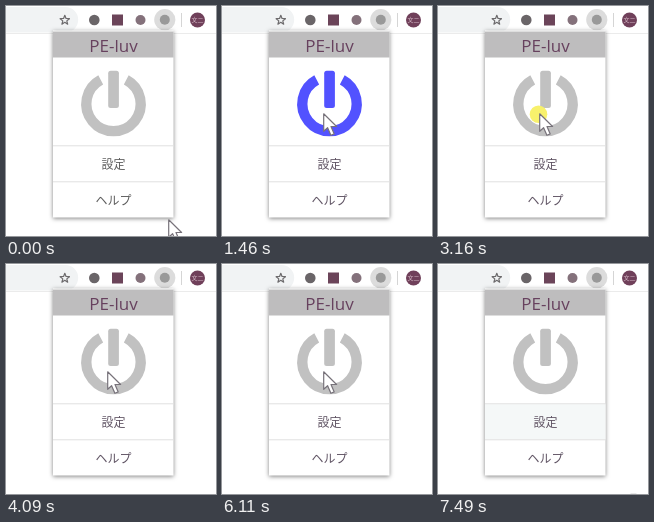
An HTML page for the animation above (7.65 s loop, 210 by 230 pixels).

```html
<!DOCTYPE html>
<html lang="ja">
<head>
<meta charset="utf-8">
<title>Popup toggle</title>
<style>
  html, body { margin: 0; width: 100%; height: 100%; overflow: hidden; background: #fff; }
  svg { display: block; width: 210px; height: 230px; overflow: visible; filter: blur(.35px); }
  text { text-anchor: middle; }
  .title { font: 500 17px "Open Sans", "Noto Sans", sans-serif; fill: #67415e; }
  .row { font: 300 12px "Noto Sans CJK JP", "Noto Sans CJK", sans-serif; }
  .badge { font: 6px "Noto Sans CJK JP", "Noto Sans CJK", sans-serif; fill: #d3b6c4; }
  #popup { filter: drop-shadow(0 1px 2px rgba(0, 0, 0, .5)); }
</style>
</head>
<body>
<svg viewBox="0 0 210 230">
  <rect x="-5" y="-5" width="220" height="240" fill="#fff"/>
  <!-- toolbar -->
  <path d="M-5 1H59.500A12.700 12.700 0 0 1 59.500 26.400H-5Z" fill="#f1f3f4"/>
  <path id="star" fill="none" stroke="#6c6a6c" stroke-width="1.200" stroke-linejoin="round"/>
  <circle cx="88.300" cy="14" r="5.300" fill="#6a6568"/>
  <rect x="106" y="8.500" width="11" height="11" fill="#6b4459"/>
  <circle cx="134.500" cy="14" r="5" fill="#84717b"/>
  <circle cx="158.800" cy="13.700" r="10.600" fill="#dcdcdc"/>
  <circle cx="158.800" cy="13.700" r="5" fill="#999"/>
  <path d="M175.500 7V21" stroke="#d5d5d5"/>
  <circle cx="191.500" cy="14" r="7.500" fill="#70405a"/>
  <text class="badge" x="191.500" y="16.300">文二</text>
  <path d="M-5 27.500H215" stroke="#ebebeb"/>
  <!-- popup -->
  <rect id="popup" x="47" y="24.500" width="120.500" height="187" fill="#fff"/>
  <rect x="47" y="25.500" width="120.500" height="26" fill="#bebdbe"/>
  <text class="title" x="107.500" y="45.500">PE-luv</text>
  <rect id="hover" x="47" width="120.500" height="35" fill="#f5f8f8"/>
  <path d="M47 139.800H167.500M47 175.800H167.500" stroke="#e0e0e0"/>
  <g id="rows" class="row">
    <text x="107.500" y="162.800">設定</text>
    <text x="107.500" y="198.500">ヘルプ</text>
  </g>
  <g id="power">
    <path id="ring" fill="none" stroke="currentColor" stroke-width="10.300"/>
    <rect x="102.200" y="64.700" width="10.700" height="37.300" rx="2.500" fill="currentColor"/>
  </g>
  <circle id="click" cx="100.500" cy="108.300" r="8.800" fill="#f8f16c"/>
  <path id="cursor" d="M.7.800V18.300L4.600 14.700 7.900 22.300 11.200 20.900 8 13.500H13.600Z"
    fill="#fff" stroke="#77727a" stroke-width="1.200" stroke-linejoin="round"/>
  <path id="edge" d="M192.500 229.500H198.500" stroke="#e6e6e6"/>
</svg>
<script>
const LOOP = 7650;
const $ = id => document.getElementById(id);
const GRAY = [193, 193, 193], BLUE = [82, 82, 255];
const START = [162, 213], PAUSE = [131, 134], BUTTON = [101, 107], EXIT = [185, 227], BEND = [192, 180];

const mix = (a, b, p) => a.map((v, i) => v + (b[i] - v) * p);
const ease = p => p * p * (3 - 2 * p);
const within = (t, a, b) => t >= a && t < b;

// Progress in n equal jumps, the first at a and the last at b.
function steps(t, a, b, n) {
  if (t < a) return 0;
  return Math.min(1, (Math.floor((t - a) / (b - a) * (n - 1) + .02) + 1) / n);
}

function cursorAt(t) {
  if (t < 680) return mix(START, PAUSE, ease(steps(t, 70, 370, 5)));
  if (t < 6260) return mix(PAUSE, BUTTON, ease(steps(t, 680, 990, 5)));
  const p = steps(t, 6260, 6720, 7);
  return mix(mix(BUTTON, BEND, p), mix(BEND, EXIT, p), p);
}

// How far the button is switched on, with a half step in each fade.
function powerAt(t) {
  if (within(t, 1460, 2070) || within(t, 3310, 4090) || within(t, 5250, 6040)) return 1;
  if (within(t, 2070, 2150) || within(t, 5170, 5250) || within(t, 6040, 6110)) return .5;
  return 0;
}

function hoverRow(t, [x, y]) {
  if (t >= 6337) return 0;
  if (t < 70 || x > 167 || y < 141 || y > 212) return -1;
  return y < 177 ? 0 : 1;
}

function draw(t) {
  const pos = cursorAt(t), row = hoverRow(t, pos);
  $('cursor').setAttribute('transform', `translate(${pos.map(Math.round)})`);
  $('cursor').setAttribute('opacity', t < 6950 ? 1 : t < 7030 ? .4 : 0);
  $('hover').setAttribute('opacity', row < 0 ? 0 : 1);
  $('hover').setAttribute('y', row === 1 ? 176.3 : 140.3);
  $('rows').setAttribute('fill', t < 220 ? '#5c5c5c' : '#5f5363');
  $('power').setAttribute('color', `rgb(${mix(GRAY, BLUE, powerAt(t)).map(Math.round)})`);
  const clicked = within(t, 1300, 1460) || within(t, 3160, 3310) || within(t, 3920, 4090);
  $('click').setAttribute('opacity', clicked ? 1 : 0);
  $('edge').setAttribute('opacity', t >= 7490 ? 1 : 0);
}

function buildShapes() {
  const star = Array.from({ length: 10 }, (_, i) => {
    const r = i % 2 ? 2.1 : 4.9, a = i * Math.PI / 5;
    return [58.8 + r * Math.sin(a), 14.2 - r * Math.cos(a)];
  });
  $('star').setAttribute('d', `M${star.join('L')}Z`);
  const r = 27.2, gap = 28 * Math.PI / 180;
  const dx = r * Math.sin(gap), y = 97.9 - r * Math.cos(gap);
  $('ring').setAttribute('d', `M${107.5 + dx} ${y}A${r} ${r} 0 1 1 ${107.5 - dx} ${y}`);
}

buildShapes();
const begin = performance.now();
function tick() {
  draw((performance.now() - begin) % LOOP);
  requestAnimationFrame(tick);
}
tick();
</script>
</body>
</html>
```
